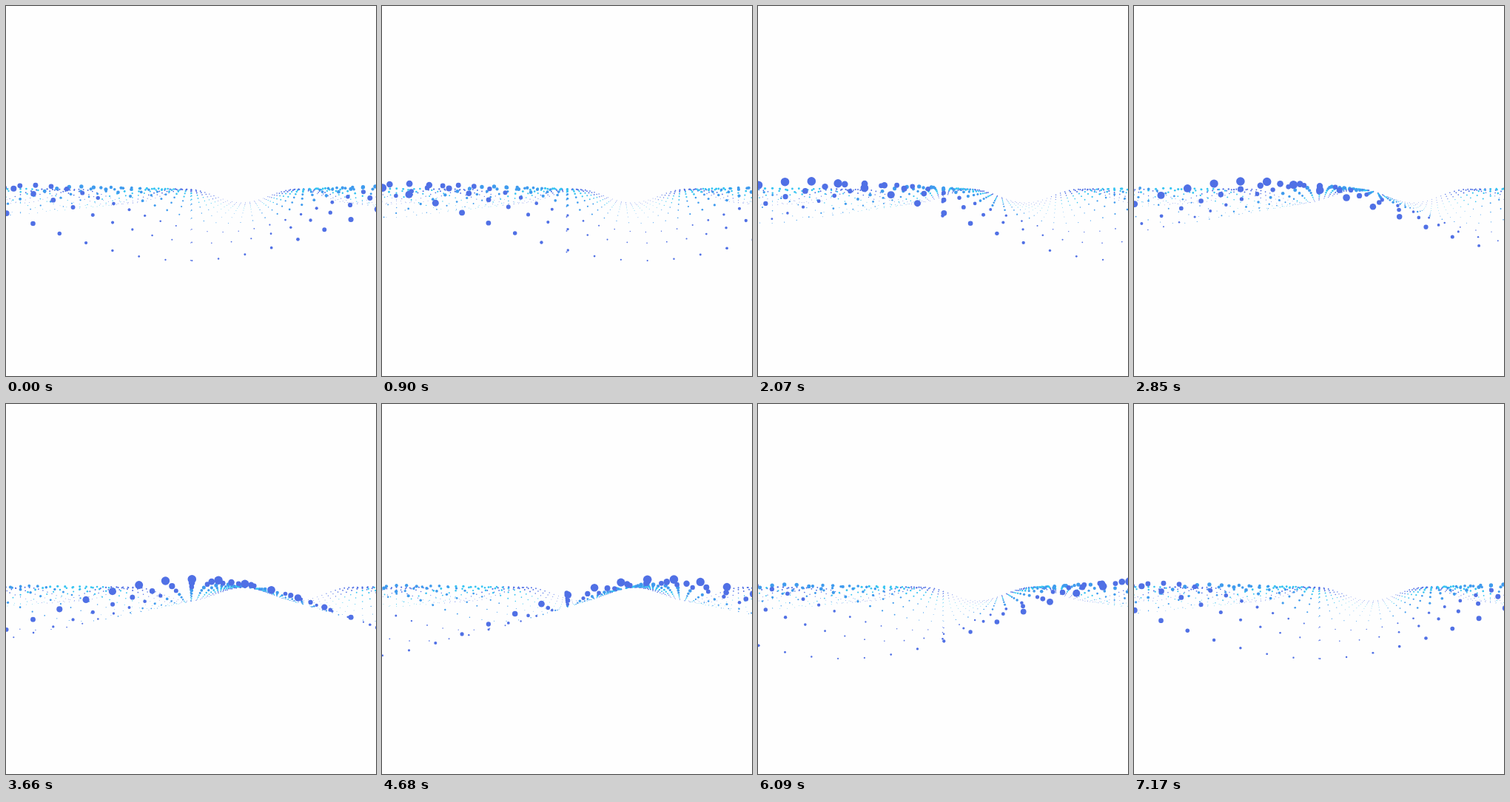
Animation, 500 px wide and 500 px high, one loop 7.2 s. Source, as an HTML page with a canvas:

```html
<!DOCTYPE html>
<html>
<head>
<meta charset="utf-8">
<style>
html, body { margin: 0; width: 100%; height: 100%; overflow: hidden; background: #fefefe; }
canvas { display: block; }
</style>
</head>
<body>
<canvas id="stage" width="500" height="500"></canvas>
<script>
const ctx = document.getElementById('stage').getContext('2d');
const LOOP = 7200, SIZE = 500, HORIZON = 250;
const PERIOD = 7143;    // of the wave, slightly shorter than the loop
const WAVE = 0.2595;    // phase per column
const ROW_SHIFT = 1.04; // columns the crest moves per row
const MIN_RADIUS = 0.45;
const COLORS = ['#5070e5', '#3f9bee', '#36c4f2'];
// Column spacing of each row, front to back
const ROWS = [35.8, 26.75, 21.1, 16.55, 13.6, 11.55, 10.05, 8.88, 7.97, 7.22, 6.6, 6.08];

function dot(x, gap, phase, scale = 1) {
  const c = Math.cos(phase);
  const r = Math.max(MIN_RADIUS, gap * (0.0965 - 0.0655 * c) * scale);
  ctx.beginPath();
  ctx.arc(x, HORIZON + gap * (1.13 + 1.5 * c), r, 0, 2 * Math.PI);
  ctx.fill();
}

function draw(now) {
  const turn = (now % LOOP) / PERIOD * 2 * Math.PI;
  ctx.fillStyle = '#fefefe';
  ctx.fillRect(0, 0, SIZE, SIZE);
  for (let row = ROWS.length - 1; row >= 0; row--) {
    const gap = ROWS[row];
    const middle = 250.4 + 0.025 * gap;
    const reach = Math.ceil(SIZE / 2 / gap) + 1;
    const phase = col => WAVE * (col + 0.2 - ROW_SHIFT * row) - turn;
    ctx.fillStyle = COLORS[Math.floor(row / 3) % 3];
    dot(249.5, gap, phase(0.27), 0.6); // seam beside the middle column
    for (let col = -reach; col <= reach; col++) {
      dot(middle + col * gap, gap, phase(col));
    }
  }
}

const start = performance.now();
function tick() {
  draw(performance.now() - start);
  requestAnimationFrame(tick);
}
tick();
</script>
</body>
</html>
```
